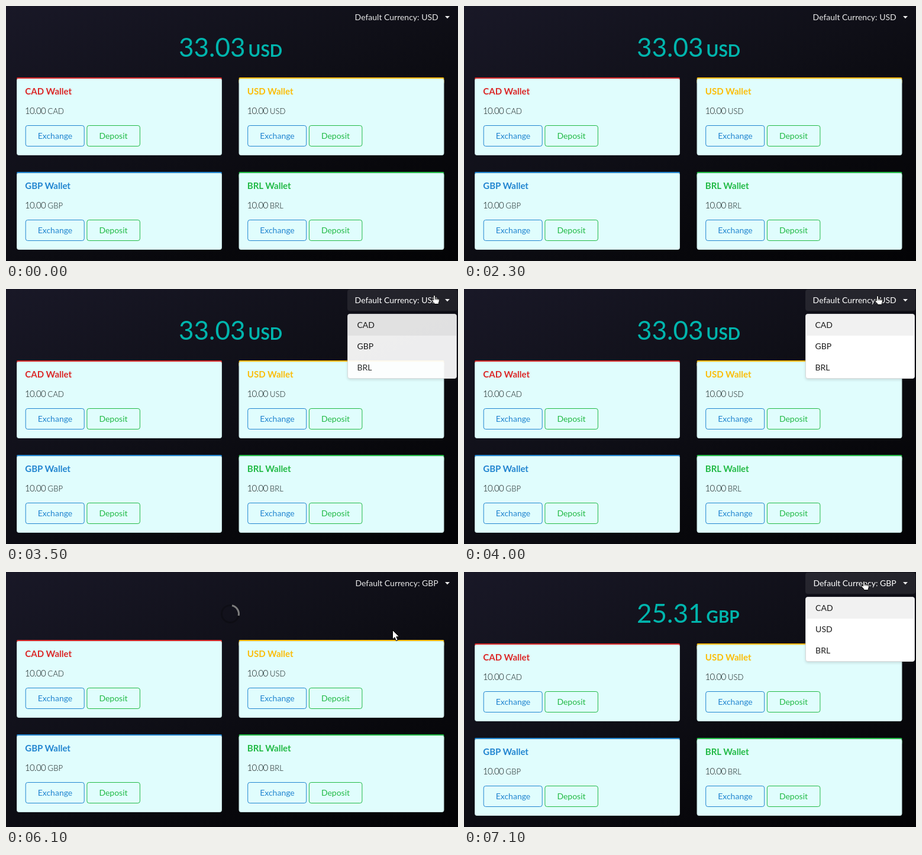
An HTML page that plays this animation: 764x432 px, repeating every 8 s.

```html
<!DOCTYPE html>
<html lang="en">
<head>
<meta charset="utf-8">
<title>Wallets</title>
<style>
  html, body { margin: 0; width: 100%; height: 100%; overflow: hidden; background: #08080c; }
  svg { display: block; width: 764px; height: 432px; font: 14px Lato, sans-serif;
        background: linear-gradient(155deg, #191827 0%, #0f0f17 45%, #08080c 72%, #030305 100%); }
  .title { font-size: 15px; font-weight: 700; }
  .amount { font-size: 15px; font-weight: 300; letter-spacing: -.65px; fill: #0c1414; }
  .code { font-size: 13px; font-weight: 300; letter-spacing: .1px; fill: #0c1414; }
  .sum { font-size: 44px; fill: #00b5ad; }
  .unit { font-size: 28px; font-weight: 700; fill: #00b5ad; }
  .ring { fill: none; stroke: #000; stroke-opacity: .25; stroke-width: 3; }
  .arc { fill: none; stroke: #7d7d7d; stroke-width: 3; }
  #menu text { fill: #1b1b1b; }
  #panel { filter: drop-shadow(0 2px 2px rgba(34, 36, 38, .15)); }
</style>
</head>
<body>
<svg viewBox="0 0 764 432">
  <defs>
    <g id="spinner">
      <circle class="ring" r="14.5"/>
      <path class="arc" d="M-10.25-10.25A14.5 14.5 0 0 1 10.25-10.25"/>
    </g>
  </defs>

  <g id="total">
    <text id="sum" class="sum" x="292" y="86"></text>
    <text id="unit" class="unit" x="409.6" y="86"></text>
  </g>
  <g id="cards"></g>

  <g id="header">
    <rect id="hover" x="577" y="1" width="186" height="36" rx="4" fill="#fff" fill-opacity=".085"/>
    <text id="label" x="730.7" y="24" text-anchor="end" fill="#fff"></text>
    <path d="M742 17h8l-4 4.2z" fill="#fff" fill-opacity=".92"/>
  </g>
  <g id="menu">
    <rect id="panel" x="577.5" y="42.5" width="184" height="109" rx="3.5" fill="#fff" stroke="#d8d8d9"/>
    <path d="M578 79V46q0-3 3-3h177q3 0 3 3V79z" fill="#f1f1f1"/>
    <text y="66"></text>
    <text y="102"></text>
    <text y="138"></text>
  </g>

  <use id="totalSpin" href="#spinner"/>
  <use id="headerSpin" href="#spinner"/>

  <g id="cursor" stroke="#000" stroke-linejoin="round">
    <path id="arrow" fill="#fff" d="M.5.5V16l3.5-3.3 2.5 5.8 2.8-1.2-2.5-5.6h4.9z"/>
    <g id="hand">
      <path fill="#fff" d="M0 .5c.9 0 1.4.6 1.4 1.4V5.6l5.4 1c1 .2 1.5.9 1.5 1.8V11l-1 2.4v2.1H-.2V14L-4 9.8C-4.6 8.7-3.2 7.4-2.1 8.3l.7.8V1.9C-1.4 1-.8.5 0 .5z"/>
      <path fill="none" stroke-width=".8" d="M1.4 5.6V8.5M3.7 6.2V8.7M6 6.6V9"/>
    </g>
  </g>
</svg>
<script>
const LOOP = 8000, STEP = 100;
const LOAD = 4900, RENAMED = 5800, LOADED = 6200;
const OPEN = [[1500, 2100], [2500, 3300], [3400, LOAD], [6900, LOOP]];

// time, x, y, shape: a = arrow, h = hand, empty = off stage
const PATH = [
  [0, 0, 0, ''],
  [900, 299, 49, 'a'], [1000, 449, 85, 'a'],
  [1200, 510, 62, 'a'], [1300, 570, 36, 'a'],
  [1500, 604, 31, 'h'], [1600, 612, 28, 'h'], [1700, 630, 25, 'h'], [1800, 640, 20, 'h'],
  [2000, 652, 8, 'h'], [2100, 0, 0, ''],
  [2500, 660, 4, 'h'], [2600, 668, 9, 'h'], [2700, 674, 14, 'h'], [2900, 680, 18, 'h'],
  [3100, 684, 19, 'a'], [3200, 690, 8, 'a'], [3300, 0, 0, ''],
  [3400, 712, 6, 'h'], [3500, 724, 10, 'h'], [3700, 741, 11, 'h'],
  [4000, 699, 11, 'h'],
  [4200, 708, 40, 'h'], [4300, 690, 84, 'h'], [4400, 666, 66, 'h'],
  [4600, 660, 82, 'h'], [4700, 654, 99, 'h'],
  [LOAD, 653, 98, 'a'],
  [6800, 662, 60, 'a'], [6900, 668, 30, 'h'], [7000, 672, 20, 'h'], [7100, 676, 15, 'h']
];

const WALLETS = [['CAD', '#db2828'], ['USD', '#fbbd08'], ['GBP', '#2185d0'], ['BRL', '#21ba45']];

const $ = id => document.getElementById(id);
const show = (el, on) => el.setAttribute('visibility', on ? 'visible' : 'hidden');
const setText = (el, s) => { if (el.textContent !== s) el.textContent = s; };

const button = (x, w, color, label) => `
  <rect x="${x + .5}" y="81.5" width="${w - 1}" height="35" rx="3.5" fill="none" stroke="${color}"/>
  <text x="${x + 21}" y="104" fill="${color}">${label}</text>`;

const card = ([code, color], i) => `
  <g transform="translate(${i % 2 * 375.5} ${121 + (i >> 1) * 160})">
    <rect x="18" width="347" height="12" rx="4" fill="${color}"/>
    <rect x="18.5" y="2" width="346" height="129.5" rx="3" fill="#e0fdfd" stroke="#c3dede"/>
    <path d="M20 0H363Q365 0 365 2H18Q18 0 20 0z" fill="${color}"/>
    <text class="title" x="32.3" y="29" fill="${color}">${code} Wallet</text>
    <text class="amount" x="32" y="62">10.00</text>
    <text class="code" x="70.5" y="62">${code}</text>
    ${button(32.7, 100, '#2185d0', 'Exchange')}
    ${button(136.4, 90.5, '#21ba45', 'Deposit')}
  </g>`;

$('cards').innerHTML = WALLETS.map(card).join('');
const items = [...$('menu').querySelectorAll('text')];

function menuAlpha(t) {
  const span = OPEN.find(([from, to]) => t >= from && t < to);
  if (!span) return 0;
  return [.3, .93][(t - span[0]) / STEP] ?? 1;
}

function draw(t) {
  const loading = t >= LOAD && t < LOADED;
  const waiting = t >= LOAD && t < RENAMED;
  const base = t < LOAD ? 'USD' : 'GBP';

  setText($('sum'), base === 'USD' ? '33.03' : '25.31');
  setText($('unit'), base);
  show($('total'), !loading);
  $('cards').setAttribute('transform', `translate(0 ${loading ? -6 : 0})`);

  const alpha = menuAlpha(t);
  setText($('label'), 'Default Currency: ' + base);
  $('label').setAttribute('fill-opacity', alpha ? 1 : .9);
  $('header').setAttribute('opacity', waiting ? 0 : 1);
  $('hover').setAttribute('opacity', alpha);
  $('menu').setAttribute('opacity', alpha);
  const others = WALLETS.map(w => w[0]).filter(c => c !== base);
  items.forEach((el, i) => {
    setText(el, others[i]);
    el.setAttribute('x', base === 'USD' ? 593.5 : 594.1);
  });

  const angle = (t - LOAD) * .6 + (waiting ? 0 : 57);
  show($('totalSpin'), loading);
  show($('headerSpin'), waiting);
  $('totalSpin').setAttribute('transform', `translate(379 71) rotate(${angle})`);
  $('headerSpin').setAttribute('transform', `translate(696 15) rotate(${angle})`);

  const [, x, y, shape] = PATH.filter(p => p[0] <= t).pop();
  $('cursor').setAttribute('transform', `translate(${x} ${y})`);
  show($('arrow'), shape === 'a');
  show($('hand'), shape === 'h');
}

function tick() {
  const t = performance.now() % LOOP;
  draw(Math.floor(t / STEP) * STEP);
  requestAnimationFrame(tick);
}
tick();
</script>
</body>
</html>
```
